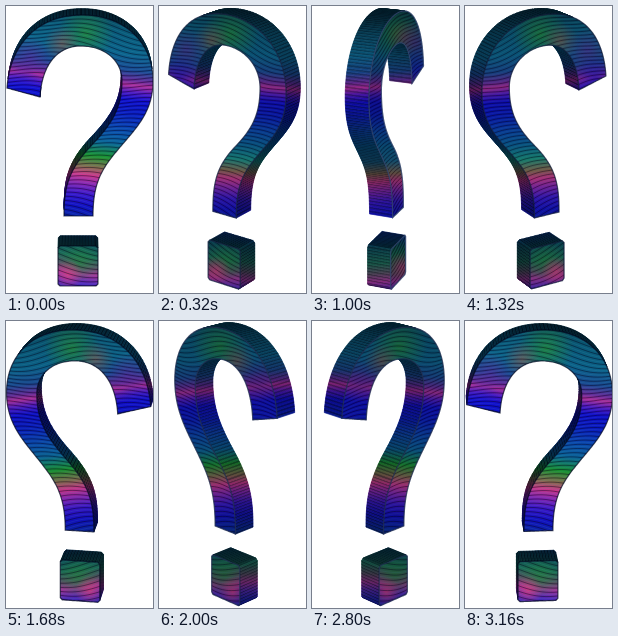
Recreate the animation shown at these times as an HTML page with a canvas. Size 147 by 287 pixels, loop 3200 ms.

```html
<!DOCTYPE html>
<html lang="en">
<head>
<meta charset="utf-8">
<title>Turning question mark</title>
<style>
  html, body { margin: 0; width: 100%; height: 100%; overflow: hidden; background: #fff; }
  canvas { display: block; }
</style>
</head>
<body>
<canvas id="stage" width="147" height="287"></canvas>
<script>
const ctx = document.getElementById('stage').getContext('2d');
const LOOP = 3200, STEP = 40;
const AXIS = 74, MID = 143, HALF = 12.5, TILT = 0.35, DISTANCE = 1500;

// Points along a cubic from p to q, excluding the end.
function curve(p, a, b, q, count) {
  return Array.from({ length: count }, (_, i) => {
    const t = i / count, u = 1 - t;
    return [0, 1].map(k =>
      u * u * u * p[k] + 3 * u * u * t * a[k] + 3 * u * t * t * b[k] + t * t * t * q[k]);
  });
}

function contour(start, segments) {
  const points = [];
  let p = start;
  for (const s of segments) {
    const q = s.slice(-2);
    const a = s.length > 2 ? s.slice(0, 2) : p.map((v, k) => v + (q[k] - v) / 3);
    const b = s.length > 2 ? s.slice(2, 4) : p.map((v, k) => v + (q[k] - v) * 2 / 3);
    const count = Math.ceil(Math.hypot(q[0] - p[0], q[1] - p[1]) / 1.5);
    points.push(...curve(p, a, b, q, count));
    p = q;
  }
  return points;
}

const hook = contour([1, 82], [
  [4, 38, 32, 9, 76, 9], [118, 9, 147, 36, 147, 75],
  [147, 108, 128, 124, 110, 146], [94, 165, 87, 180, 87, 210],
  [58, 210], [58, 182, 62, 165, 84, 141], [104, 120, 116, 104, 116, 75],
  [116, 54, 98, 40, 75, 40], [52, 40, 36, 58, 34, 91], [1, 82]
]);
const dot = contour([54, 240], [
  [90, 240], [92, 242], [92, 278], [90, 280], [54, 280], [52, 278], [52, 242], [54, 240]
]);
const shapes = [hook, dot];

// Vertical colour bands; the green one turns blue while the right side faces us.
function bands(sin) {
  return [
    [0, '#083c4c'], [20, '#0a5a78'], [42, '#0c648c'], [58, '#1a4a94'],
    [68, '#6a2a9c'], [73, '#b22c9c'], [80, '#5418c4'], [88, '#100cd0'], [102, '#0a1cc4'],
    [118, '#0a48b0'], [133, '#0a6498'],
    [148, `hsl(${130 + 75 * Math.max(0, sin)},70%,34%)`],
    [160, '#8a6c50'], [168, '#d0388c'], [177, '#8c26b4'], [188, '#3a16cc'],
    [200, '#1210c4'], [215, '#0a2c9c'], [234, '#0a4a58'], [250, '#1c6a54'],
    [260, '#5c5064'], [268, '#a43498'], [277, '#5428bc'], [286, '#1a20b0']
  ];
}

function project(x, y, z, cos, sin) {
  const depth = (x - AXIS) * sin + z * cos;
  const scale = 1 + (depth - HALF) / DISTANCE;
  return [
    AXIS + ((x - AXIS) * cos - z * sin) * scale,
    MID + (y - MID + (depth - HALF) * TILT) * scale
  ];
}

function trace(points, close = true) {
  points.forEach(([x, y], i) => i ? ctx.lineTo(x, y) : ctx.moveTo(x, y));
  if (close) ctx.closePath();
}

function spectrum(cos, sin) {
  const slope = 0.12 * cos, shift = 8 * sin;
  const length = 287 / (1 + slope * slope);
  const g = ctx.createLinearGradient(AXIS, shift, AXIS - slope * length, shift + length);
  bands(sin).forEach(([y, color]) => g.addColorStop(y / 287, color));
  return g;
}

function visibleWalls(cos, sin) {
  const walls = [];
  for (const shape of shapes) {
    shape.forEach((a, i) => {
      const b = shape[(i + 1) % shape.length];
      const quad = [[a, HALF], [b, HALF], [b, -HALF], [a, -HALF]]
        .map(([p, z]) => project(p[0], p[1], z, cos, sin));
      const area = quad.reduce((sum, p, k) => {
        const q = quad[(k + 1) % 4];
        return sum + p[0] * q[1] - q[0] * p[1];
      }, 0);
      if (area >= 0) return;
      const dx = b[0] - a[0], dy = b[1] - a[1];
      const facing = (dy * sin * 0.93 + dx * TILT) / Math.hypot(dx, dy);
      const x = (a[0] + b[0]) / 2 - AXIS, y = (a[1] + b[1]) / 2;
      walls.push({
        quad,
        depth: x * sin * 0.93 - y * 0.4,
        shade: 0.78 * Math.max(0, 1 - facing) ** 0.8 + (i % 2 ? 0.24 : 0)
      });
    });
  }
  return walls.sort((a, b) => a.depth - b.depth);
}

function glow([x, y], radius, rgb, alpha) {
  const g = ctx.createRadialGradient(x, y, 0, x, y, radius);
  g.addColorStop(0, `rgba(${rgb},${alpha})`);
  g.addColorStop(1, `rgba(${rgb},0)`);
  ctx.fillStyle = g;
  ctx.fillRect(x - radius, y - radius, radius * 2, radius * 2);
}

function grooves(at) {
  ctx.lineWidth = 0.9;
  for (let k = -16; k < 132; k++) {
    const line = [];
    for (let x = -4; x <= 152; x += 4) {
      line.push(at(x, k * 2.3 + 5 * Math.sin(x / 19 + k / 11) + 0.14 * x));
    }
    ctx.strokeStyle = k % 2 ? 'rgba(0,4,28,.5)' : 'rgba(90,190,210,.14)';
    ctx.beginPath();
    trace(line, false);
    ctx.stroke();
  }
}

function drawCap(paint, cos, sin) {
  const z = cos > 0 ? HALF : -HALF, turn = Math.abs(sin);
  const at = (x, y) => project(x, y, z, cos, sin);
  const outline = new Path2D();
  for (const shape of shapes) {
    shape.forEach((p, i) => outline[i ? 'lineTo' : 'moveTo'](...at(...p)));
    outline.closePath();
  }
  ctx.save();
  ctx.fillStyle = paint;
  ctx.fill(outline);
  ctx.clip(outline);
  glow(at(80, 28), 28, '36,140,50', 0.75);
  glow(at(56, 38), 18, '150,90,70', 0.6);
  glow(at(24, 52), 22, '96,34,160', 0.6);
  glow(at(14, 84), 24, '20,14,215', 0.7);
  glow(at(74, 256), 20, '30,130,60', 0.7);
  glow(at(62, 269), 15, '220,60,130', 0.8);
  grooves(at);
  ctx.fillStyle = `rgba(0,0,12,${0.36 * turn})`;
  ctx.fillRect(0, 0, 147, 287);
  ctx.restore();
  ctx.strokeStyle = 'rgba(0,8,30,.7)';
  ctx.lineWidth = 1.2;
  ctx.stroke(outline);
  ctx.strokeStyle = `rgba(130,170,240,${0.35 * turn * turn})`;
  ctx.stroke(outline);
}

function draw(time) {
  const angle = Math.floor((time % LOOP) / STEP) * STEP / LOOP * Math.PI * 2;
  const cos = Math.cos(angle), sin = Math.sin(angle);
  const paint = spectrum(cos, sin);
  ctx.fillStyle = '#fff';
  ctx.fillRect(0, 0, 147, 287);
  ctx.lineWidth = 0.6;
  for (const { quad, shade } of visibleWalls(cos, sin)) {
    ctx.beginPath();
    trace(quad);
    ctx.fillStyle = ctx.strokeStyle = paint;
    ctx.fill();
    ctx.stroke();
    ctx.fillStyle = ctx.strokeStyle = `rgba(0,6,16,${shade})`;
    ctx.fill();
    ctx.stroke();
  }
  drawCap(paint, cos, sin);
}

const start = performance.now();
function tick() {
  draw(performance.now() - start);
  requestAnimationFrame(tick);
}
tick();
</script>
</body>
</html>
```
